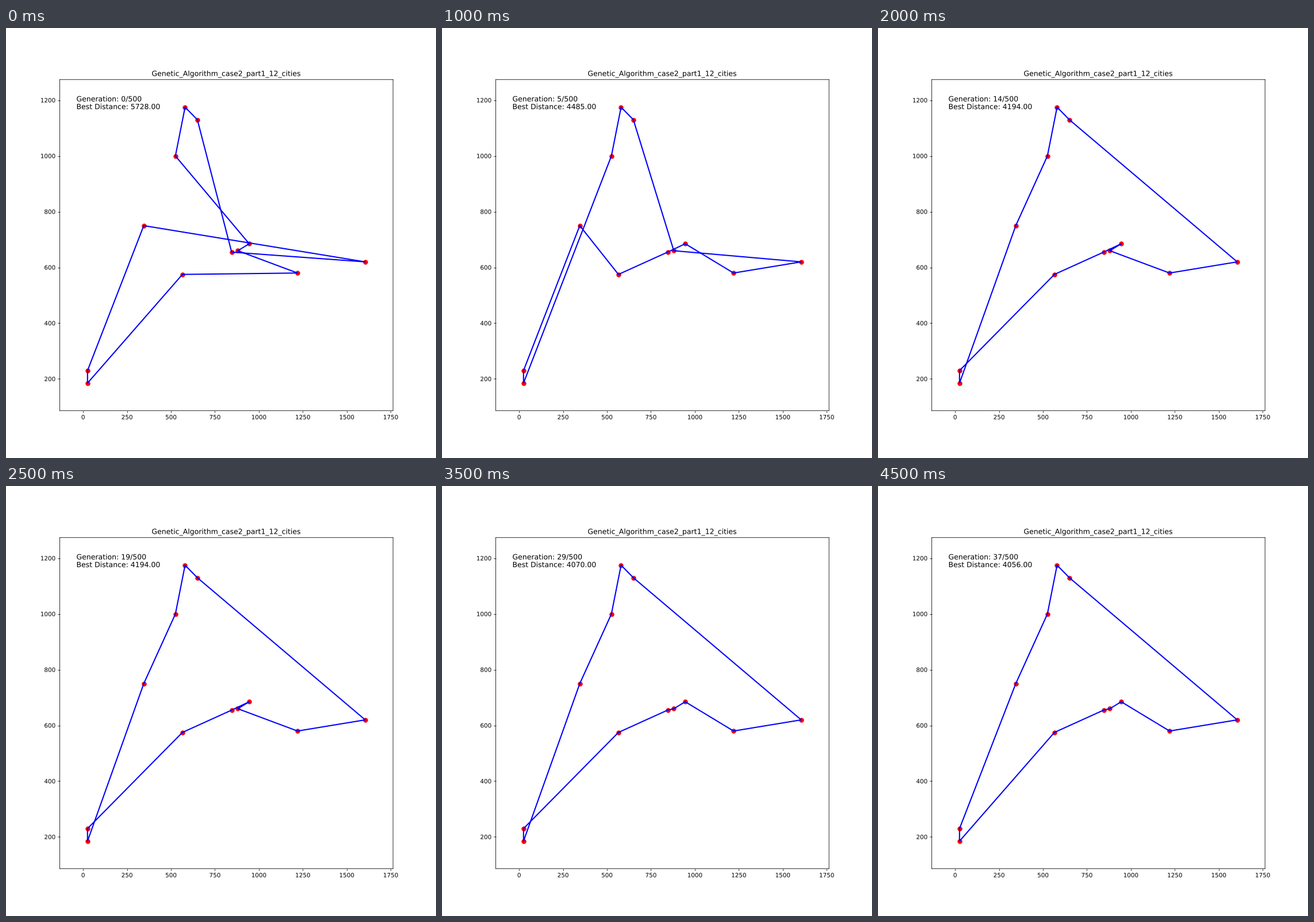
Write a matplotlib script that moves like this. It is 748 by 748 pixels and loops after 5000 ms.

```python
import numpy as np
import matplotlib.pyplot as plt
from matplotlib.animation import FuncAnimation
from matplotlib.patheffects import Normal

SIZE = 748
DPI = 74.8
STEP_MS = 500

# Sub-pixel placement: no snapping, no hinting, text and markers drawn as paths
plt.rcParams.update({
    "path.snap": False,
    "path.effects": [Normal()],
    "text.hinting": "no_hinting",
})

# Cities listed in the order of the best tour
CITIES = np.array([
    (565, 575), (25, 185), (25, 230), (345, 750), (525, 1000), (580, 1175),
    (650, 1130), (1605, 620), (1220, 580), (945, 685), (880, 660), (845, 655),
])

# Generation, and the (city, position) moves that still spoil the best tour
STEPS = [
    (0, [(6, 4), (5, 5), (11, 4), (7, 4), (8, 11)]),
    (2, [(3, 1), (4, 1), (6, 11), (5, 11), (11, 7), (10, 8)]),
    (5, [(2, 1), (3, 1), (10, 7)]),
    (10, [(2, 1), (10, 7)]),
    (14, [(2, 1), (10, 9)]),
    (19, [(2, 1), (10, 9)]),
    (24, [(2, 1), (8, 7)]),
    (29, [(2, 1)]),
    (33, []),
    (37, []),
]


def closed_path(moves):
    order = list(range(len(CITIES)))
    for city, position in moves:
        order.remove(city)
        order.insert(position, city)
    return CITIES[order + order[:1]]


def tour_length(path):
    return int(np.hypot(*np.diff(path, axis=0).T).sum())


def padded(values, share=0.1):
    low, high = values.min(), values.max()
    pad = share * (high - low)
    return low - pad, high + pad


fig, ax = plt.subplots(figsize=(SIZE / DPI, SIZE / DPI), dpi=DPI)
ax.set_title("Genetic_Algorithm_case2_part1_12_cities")
ax.set_xlim(*padded(CITIES[:, 0]))
ax.set_ylim(*padded(CITIES[:, 1]))
ax.scatter(*CITIES.T, c="red", s=50)
route, = ax.plot([], [], color="blue", lw=2)
label = ax.text(0.05, 0.95, "", transform=ax.transAxes, fontsize=12, va="top")


def update(i):
    generation, moves = STEPS[i]
    path = closed_path(moves)
    route.set_data(*path.T)
    label.set_text(f"Generation: {generation}/500\n"
                   f"Best Distance: {tour_length(path):.2f}")
    return route, label


anim = FuncAnimation(fig, update, frames=len(STEPS), interval=STEP_MS,
                     repeat=True, repeat_delay=0)
plt.show()
```
